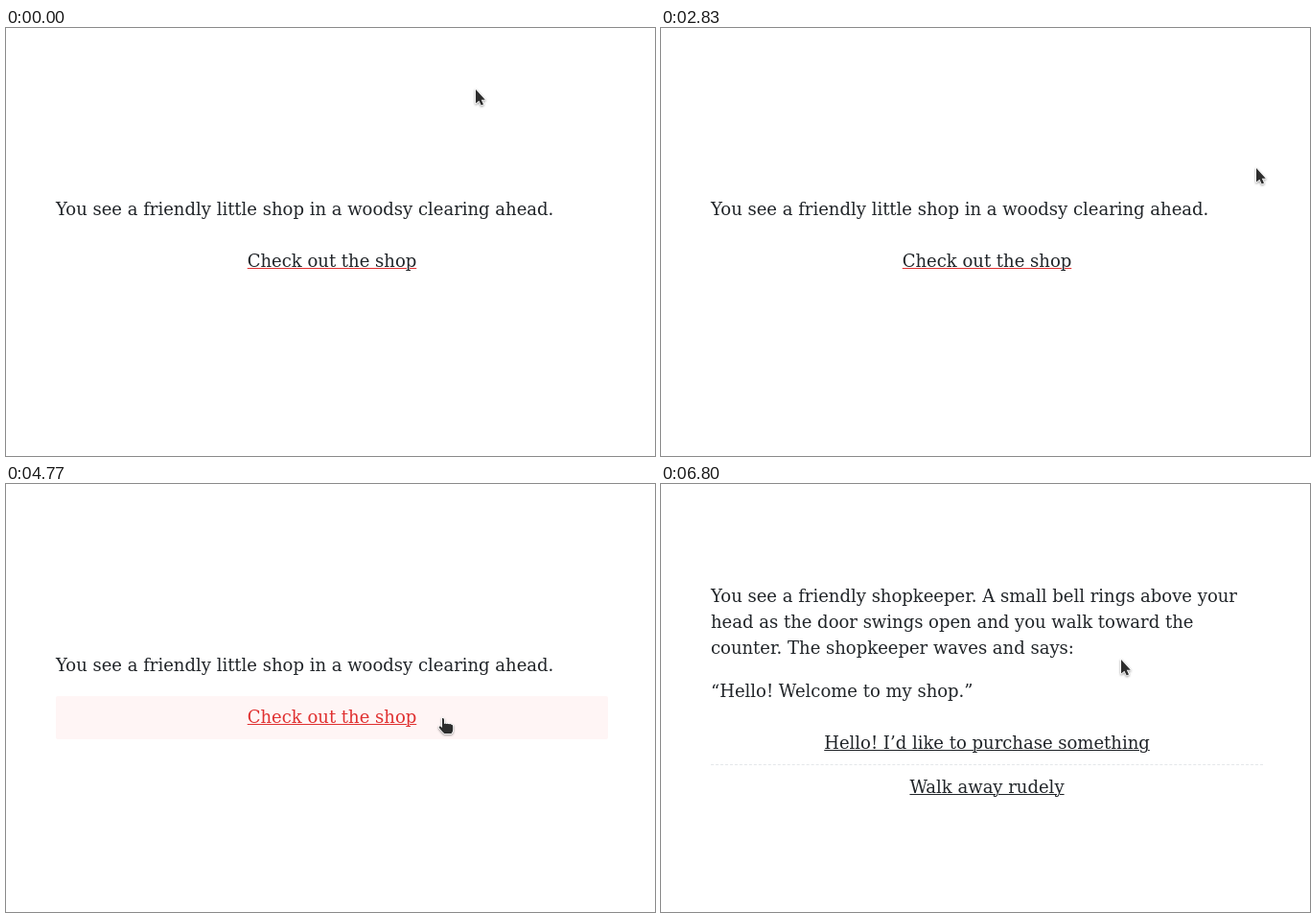
Recreate the animation shown at these times as an HTML page. Size 677 by 446 pixels, loop 8 s.

```html
<!DOCTYPE html>
<html lang="en">
<head>
<meta charset="utf-8">
<title>Shop story</title>
<style>
  html, body { margin: 0; width: 100%; height: 100%; overflow: hidden; background: #fff; }
  body { position: relative; font: 18px/27px "DejaVu Serif", serif; color: #212529; }
  .page { position: absolute; inset: 0; }
  .page > * { position: absolute; left: 52px; width: 576px; margin: 0; white-space: nowrap; }
  .link { text-align: center; }
  .link span { text-decoration: underline 1px; }
  #shop { top: 221px; padding: 8px 0 10px; border-radius: 2px; }
  #shop span { text-decoration-color: #e03131; }
  #shop.hover { color: #e03131; background: #fff5f5; }
  #shop.left span { text-decoration-color: currentColor; }
  hr { border: 0; border-top: 1px dashed #e4e7ea; }
  svg { position: absolute; left: 0; top: 0; overflow: visible; filter: drop-shadow(0 1px 1px #0006); }
  path { fill: #2d2d2d; stroke: #fff; stroke-width: 1.6; stroke-linejoin: round; paint-order: stroke; }
</style>
</head>
<body>
<div class="page" id="clearing">
  <p style="top:175px">You see a friendly little shop in a woodsy clearing ahead.</p>
  <div class="link" id="shop"><span>Check out the shop</span></div>
</div>
<div class="page" id="counter">
  <p style="top:103px">You see a friendly shopkeeper. A small bell rings above your<br>head as the door swings open and you walk toward the<br>counter. The shopkeeper waves and says:</p>
  <p style="top:202px">“Hello! Welcome to my shop.”</p>
  <div class="link" style="top:256px"><span>Hello! I’d like to purchase something</span></div>
  <hr style="top:292px">
  <div class="link" style="top:302px"><span>Walk away rudely</span></div>
</div>
<svg id="cursor" width="20" height="20">
  <path id="arrow" d="M0 0V14.6L3.4 11.7L5.7 16.5L8 15.4L5.8 10.7H9.8Z"/>
  <path id="hand" d="M0 -2Q1.6 -2.4 2 -.6V4Q3.4 3 4.6 4Q6 3.2 7.2 4.3Q8.6 3.6 9.6 4.7Q11.2 4.5 11.2 6.4V10Q11.2 12.5 9.6 14H2.2Q0 12 -1.6 10L-3.3 7.8Q-3.4 6 -1.6 6.6L0 8Z"/>
</svg>
<script>
const LOOP = 8000, CLICK = 5830, FADE_END = 6370;
const $ = id => document.getElementById(id);
const linear = p => p;
const smooth = p => p * p * (3 - 2 * p);

// Each move: first step, last step, step count, easing, Bezier points
const moves = [
  [600, 1000, 11, smooth, [[490, 64], [216, 84]]],
  [1300, 1770, 11, smooth, [[216, 84], [490, 102]]],
  [2300, 2470, 5, linear, [[490, 102], [546, 97], [612, 105]]],
  [2630, 3070, 10, linear, [[612, 105], [633, 145], [606, 188]]],
  [3830, 4630, 21, linear, [[606, 188], [590, 150], [455, 180], [455, 237]]],
  [4670, 4770, 3, linear, [[455, 237], [455, 246]]],
  [6670, 6800, 5, linear, [[455, 246], [480, 183]]],
];

function bezier(points, p) {
  if (points.length === 1) return points[0];
  const next = points.slice(1).map(([x, y], i) => [
    points[i][0] + (x - points[i][0]) * p,
    points[i][1] + (y - points[i][1]) * p,
  ]);
  return bezier(next, p);
}

// Progress in held steps; the first step is already taken at the start time
function stepped(t, start, end, count) {
  if (t < start) return 0;
  const step = Math.floor((t - start) / (end - start) * (count - 1) + 1e-6) + 1;
  return Math.min(1, step / count);
}

function pointer(t) {
  const [start, end, count, ease, points] = moves.findLast(m => t >= m[0]) || moves[0];
  return bezier(points, ease(stepped(t, start, end, count))).map(Math.round);
}

function draw(t) {
  const [x, y] = pointer(t);
  const left = t >= CLICK;
  const hover = !left && y >= 221;
  $("cursor").style.transform = `translate(${x}px, ${y}px)`;
  $("arrow").style.display = hover ? "none" : "";
  $("hand").style.display = hover ? "" : "none";
  $("shop").classList.toggle("hover", hover);
  $("shop").classList.toggle("left", left);

  const p = stepped(t, CLICK, FADE_END, 11);
  $("clearing").style.opacity = 1 - p * p;
  $("clearing").style.transform = left ? "translateY(1px)" : "";
  $("counter").style.opacity = 1 - (1 - p) ** 1.5;
}

function frame() {
  draw(performance.now() % LOOP);
  requestAnimationFrame(frame);
}
frame();
</script>
</body>
</html>
```
